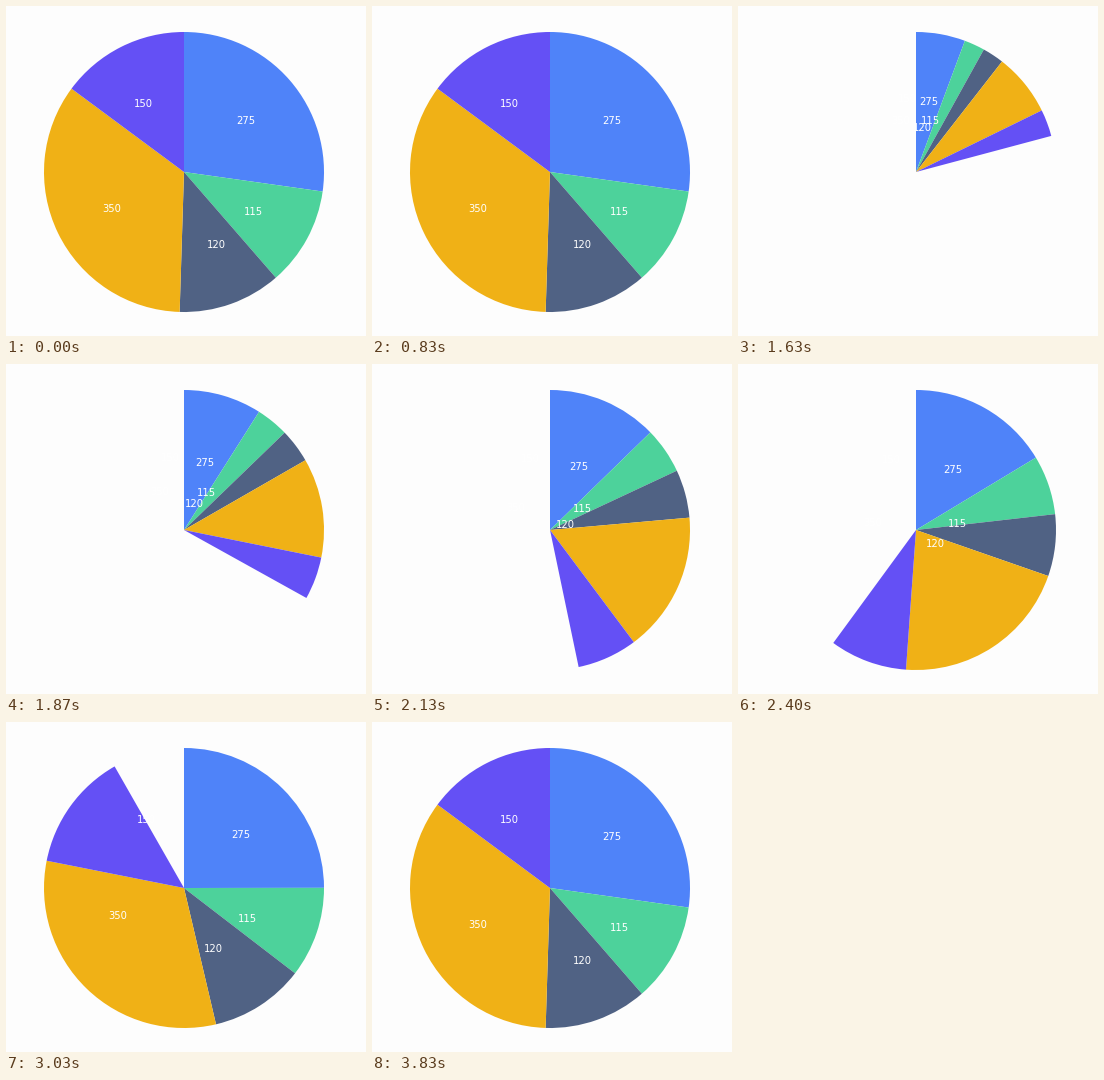
A matplotlib script that plays this animation: 360 px wide and 330 px high, repeating every 3.86 s.

```python
import numpy as np
import matplotlib.pyplot as plt
from matplotlib.animation import FuncAnimation
from matplotlib.patches import Wedge

W, H, DPI = 360, 330, 100
LOOP, FRAMES = 3860, 116
CENTER, RADIUS = (178, 166), 140
LABEL_START = np.array([178, 91])

# value, colour, resting place of the label's middle
SLICES = [
    (275, "#4f83f9", (239.8, 114.5)),
    (115, "#4dd29b", (247.2, 205.5)),
    (120, "#506284", (210.0, 238.5)),
    (350, "#f0b116", (105.4, 202.5)),
    (150, "#6450f5", (137.0, 97.5)),
]
values = [s[0] for s in SLICES]
bounds = 360 * np.concatenate([[0], np.cumsum(values)]) / sum(values)

fig = plt.figure(figsize=(W / DPI, H / DPI), dpi=DPI, facecolor="#fdfdfd")
ax = fig.add_axes([0, 0, 1, 1])
ax.set_xlim(0, W)
ax.set_ylim(H, 0)
ax.axis("off")

wedges, labels = [], []
for value, color, _ in SLICES:
    wedges.append(ax.add_patch(Wedge(CENTER, RADIUS, 0, 1, facecolor=color, lw=0)))
    labels.append(ax.text(0, 0, str(value), color="white", family="DejaVu Sans",
                          size=10 * 72 / DPI, ha="center", va="baseline", zorder=3))


def progress(n):
    """Hold the full pie, cut to empty, then sweep open at a steady pace."""
    if n < 36:
        return 1.0
    return float(np.interp(n, [36.5, 49, 60, 95.95], [0, 0.2085, 0.4005, 1]))


def draw(n):
    p = progress(n)
    for i, (_, _, rest) in enumerate(SLICES):
        wedges[i].set_theta1(bounds[i] * p - 90)
        wedges[i].set_theta2(bounds[i + 1] * p - 90)
        wedges[i].set_visible(p > 0)
        x, y = LABEL_START + (np.array(rest) - LABEL_START) * p
        labels[i].set_position((x, y + 3.6))
    return wedges + labels


anim = FuncAnimation(fig, draw, frames=FRAMES, interval=LOOP / FRAMES,
                     repeat=True, repeat_delay=0, blit=False)
plt.show()
```
